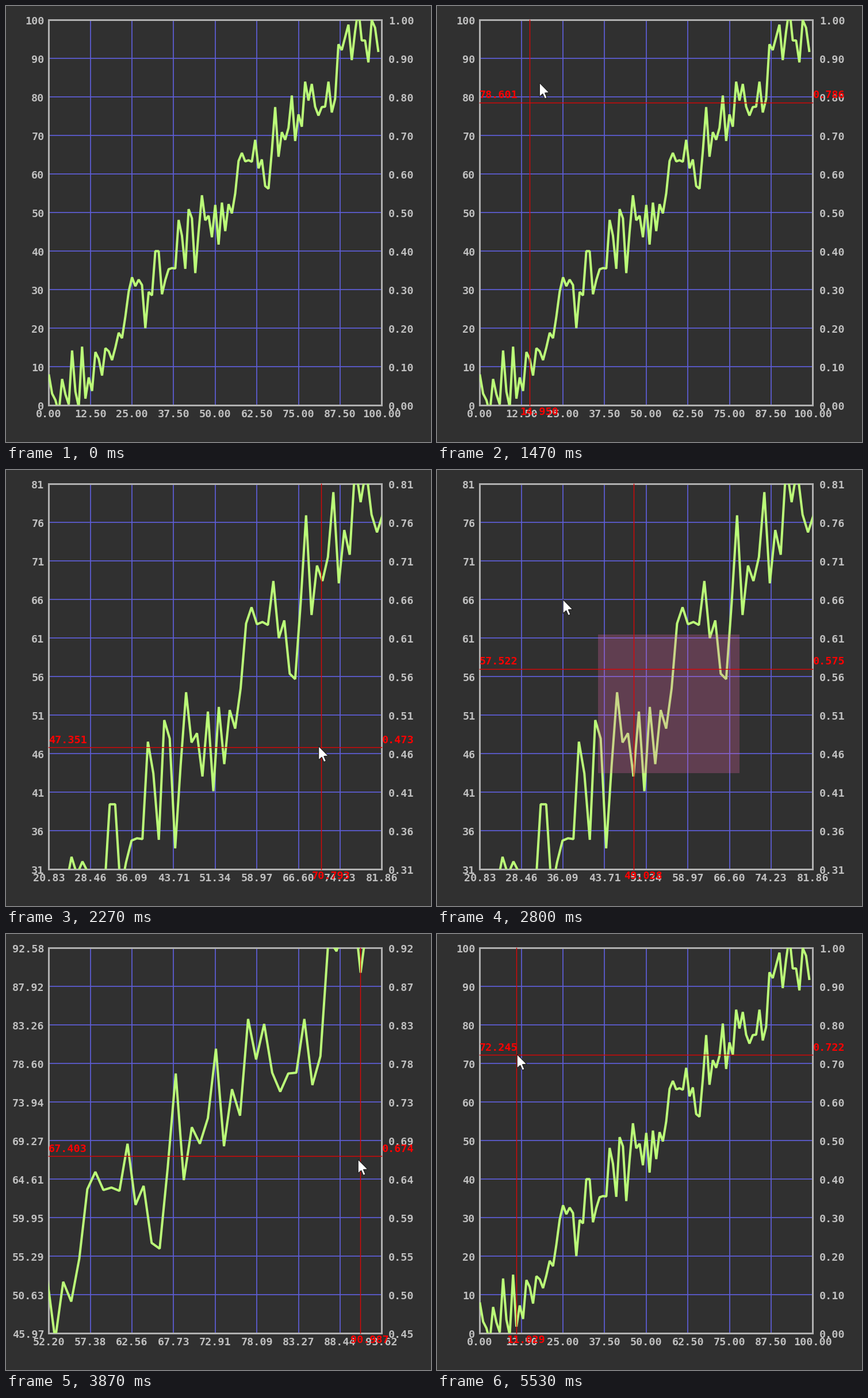
These frames come from a looping animation (739x758 px, 6.33 s). A matplotlib script:

```python
import math

import matplotlib.pyplot as plt
import numpy as np
from matplotlib.animation import FuncAnimation
from matplotlib.patches import Polygon, Rectangle

W, H, DPI = 739, 758, 100
FRAMES, LOOP_MS = 95, 6330
LEFT, RIGHT, TOP, BOTTOM = 74.4, 653.3, 24.4, 694
BACK, GREY, GRID = "#303030", "#b0b0b0", "#5e5ed8"
CURVE, RED, TEXT = "#bbfb78", "#dc0505", "#c0c0c0"
PX = 72 / DPI

VALUES = np.array([
    8, 3, 1.3, -2, 6.8, 2.8, 0.2, 14.2, 3.5, -0.5,
    15.2, 1.7, 7.2, 3.7, 13.8, 12, 7.7, 14.8, 14, 11.7,
    15, 18.8, 17.4, 23, 29.5, 33.2, 30.9, 32.6, 31.2, 20,
    29.4, 28.5, 40, 40, 28.8, 32.5, 35.3, 35.6, 35.5, 48.1,
    44, 35.4, 50.9, 48.5, 34.3, 45, 54.5, 48, 49.2, 43.6,
    52, 41.7, 52.6, 45.2, 52.2, 49.8, 55, 63.4, 65.5, 63.3,
    63.6, 63.2, 68.9, 61.5, 63.8, 56.9, 56.2, 66, 77.4, 64.5,
    70.9, 68.9, 72, 80.4, 68.6, 75.5, 72.3, 84, 79.1, 83.4,
    77.5, 75.2, 77.4, 77.5, 84, 76, 79.5, 93.7, 92.2, 95.5,
    98.8, 89.6, 97, 103, 94.7, 94.7, 89, 100, 98, 91.7])

# view: x low, x high, y low, y high, decimals of the left axis
FULL = (0, 100, 0, 100, 0)
WIDE = (20.832, 81.864, 31.6, 81.45, 0)
CLOSE = (52.205, 93.625, 45.973, 92.586, 2)
VIEW_CHANGES = ((69, FULL), (58, CLOSE), (44, FULL), (33, WIDE), (0, FULL))

# pointer path: step, x and y in percent of the plot
PATH = np.array([
    (10, 70, 55), (13, 60, 40), (17, 30, 45), (20, 13, 68),
    (22, 14.9505, 78.6015), (24, 17.95, 83.7), (26, 20.832, 81.45),
    (29, 43, 62), (33, 81.861, 31.598), (34, 81.861, 31.598),
    (36, 81.05, 31.95), (39, 78, 25), (44, 25, 70), (46, 62, 76),
    (48, 57.5985, 86.6525), (50, 54.2, 89.85), (51, 52.205, 92.586),
    (56, 93.632, 45.975), (58, 93.632, 45.975), (60, 92.9, 45.1),
    (62, 88, 38), (64, 81.1335, 35.1715), (65, 81.1335, 35.1715),
    (66, 57.3, 46.7), (67, 17.2, 67.6), (69, 12.2, 70.6),
    (71, 11.6, 71.8), (73, 11.2, 72.4), (83, 11.0295, 72.2455),
    (85, 11.2, 72.4)])
DRAGS = ((26, 33), (39, 44), (51, 58), (65, 69))
ARROW = 1.45 * np.array([(0, 0), (0, 16.6), (3.8, 13.2), (6.3, 19),
                         (8.9, 17.9), (6.4, 12.1), (11.6, 11.8)])


def pointer(step):
    return [np.interp(step, PATH[:, 0], PATH[:, k]) for k in (1, 2)]


def to_px(x, y):
    return LEFT + x * (RIGHT - LEFT) / 100, BOTTOM - y * (BOTTOM - TOP) / 100


def cut(value, digits):
    """Format with the surplus decimals cut off, not rounded."""
    scale = 10 ** digits
    return f"{math.floor(value * scale + 1e-6) / scale:.{digits}f}"


fig = plt.figure(figsize=(W / DPI, H / DPI), dpi=DPI, facecolor=BACK)
ax = fig.add_axes([0, 0, 1, 1])
ax.set(xlim=(0, W), ylim=(H, 0))
ax.axis("off")


def label(x, y, align, color=TEXT, z=5):
    return ax.text(x, y + 6.5, "", ha=align, va="baseline", color=color,
                   family="DejaVu Sans Mono", weight="bold",
                   fontsize=18.5 * PX, zorder=z)


x_ticks = [to_px(100 * k / 8, 0)[0] for k in range(9)]
y_ticks = [to_px(0, 10 * k)[1] for k in range(11)]
for x in x_ticks[1:-1]:
    ax.plot([x, x], [TOP, BOTTOM], color=GRID, lw=1.7 * PX, zorder=1)
for y in y_ticks[1:-1]:
    ax.plot([LEFT, RIGHT], [y, y], color=GRID, lw=1.7 * PX, zorder=1)
ax.add_patch(Rectangle((LEFT, TOP), RIGHT - LEFT, BOTTOM - TOP, fill=False,
                       ec=GREY, lw=3 * PX, zorder=2))

x_labels = [label(x, 708.5, "center") for x in x_ticks]
y_labels = [label(66.5, y + 1, "right") for y in y_ticks]
ratio_labels = [label(665, y + 1, "left") for y in y_ticks]

curve, = ax.plot([], [], color=CURVE, lw=4 * PX, zorder=3,
                 solid_joinstyle="bevel", solid_capstyle="butt")
curve.set_clip_path(Rectangle((LEFT, TOP), RIGHT - LEFT, BOTTOM - TOP,
                              transform=ax.transData))
selection = Rectangle((0, 0), 0, 0, fc="#f068b0", alpha=0.25, lw=0, zorder=4)
ax.add_patch(selection)
h_line, = ax.plot([], [], color=RED, lw=1.4 * PX, zorder=6)
v_line, = ax.plot([], [], color=RED, lw=1.4 * PX, zorder=6)
cross_labels = [label(0, 0, "left", "#ff0000", 7) for _ in range(3)]
arrow = Polygon(ARROW, fc="white", ec="#202020", lw=1.2 * PX, zorder=9)
ax.add_patch(arrow)
hover_parts = [h_line, v_line, arrow, *cross_labels]


def draw_view(view):
    x0, x1, y0, y1, digits = view
    curve.set_data(*to_px(100 * (np.arange(len(VALUES)) - x0) / (x1 - x0),
                          100 * (VALUES - y0) / (y1 - y0)))
    for text, value in zip(x_labels, np.linspace(x0, x1, 9)):
        text.set_text(cut(value, 2))
    for left, right, value in zip(y_labels, ratio_labels,
                                  np.linspace(y0, y1, 11)):
        left.set_text(cut(value, digits))
        right.set_text(cut(value / 100, 2))


def draw_cross(step, view):
    x0, x1, y0, y1, _ = view
    px, py = pointer(step)
    x, y = to_px(px, py)
    h_line.set_data([LEFT, RIGHT], [y, y])
    v_line.set_data([x, x], [TOP, BOTTOM])
    x_value = x0 + px * (x1 - x0) / 100
    y_value = y0 + py * (y1 - y0) / 100
    spots = ((74, y - 14, cut(y_value, 3)),
             (653.5, y - 14, cut(y_value / 100, 3)),
             (x - 17, 704.5, cut(x_value, 3)))
    for text, (tx, ty, string) in zip(cross_labels, spots):
        text.set_position((tx, ty + 6.5))
        text.set_text(string)


def draw_selection(step):
    selection.set_visible(False)
    for start, stop in DRAGS:
        if start <= step < stop:
            xa, ya = to_px(*pointer(start))
            xb, yb = to_px(*pointer(step + 1))
            selection.set_bounds(min(xa, xb), min(ya, yb),
                                 abs(xb - xa), abs(yb - ya))
            selection.set_visible(True)


def update(n):
    view = next(v for start, v in VIEW_CHANGES if n >= start)
    draw_view(view)
    # the pointer rests twice before the next move is shown
    step = 83 if n >= 83 else 56 if n == 57 else min(n, 71)
    for part in hover_parts:
        part.set_visible(n >= 10)
    draw_cross(step, view)
    draw_selection(step)
    # the arrow runs ahead of the lagging crosshair
    arrow.set_xy(ARROW + to_px(*pointer(step + 2)))
    return []


anim = FuncAnimation(fig, update, frames=FRAMES, interval=LOOP_MS / FRAMES,
                     repeat=True, repeat_delay=0, blit=False)
plt.show()
```
